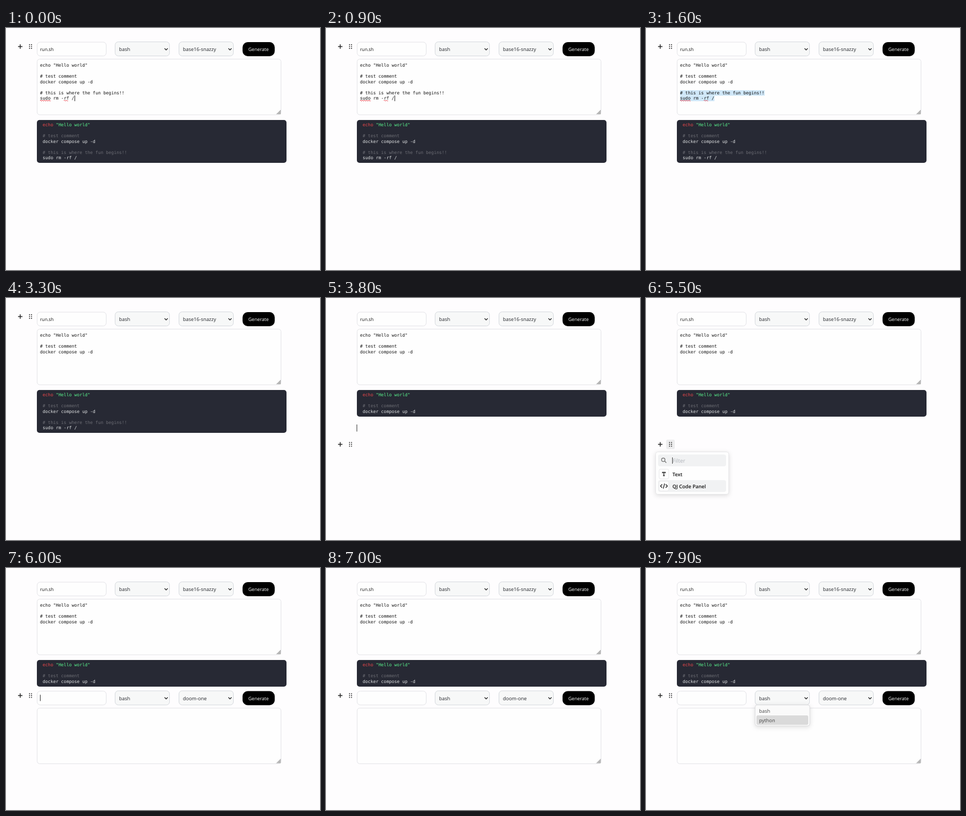
Write an HTML page that moves like this. It is 600 by 463 pixels and loops after 8000 ms.

```html
<!DOCTYPE html>
<html lang="en">
<head>
<meta charset="utf-8">
<title>Code block editor</title>
<style>
  html, body { margin: 0; height: 100%; overflow: hidden; background: #fefdfe; }
  svg { display: block; width: 100vw; height: 100vh; }
  text { font: 9.4px "Open Sans", "Noto Sans", sans-serif; fill: #24262b; text-rendering: geometricPrecision; white-space: pre; }
  .mono { font: 8.4px "DejaVu Sans Mono", monospace; fill: #111; }
  .mono.dark { fill: #e2e4e5; }
  .red { fill: #f0484c; }
  .green { fill: #5af78e; }
  .dim { fill: #6c6d74; }
  .bold { font-weight: 600; font-size: 9.5px; fill: #111; }
  .box { fill: #fefefe; stroke: #e2e2e6; }
  .select { fill: #f7f8f8; stroke: #d3d7dc; }
  .line { fill: none; stroke: #222; stroke-width: 1.4; }
  .shadow { filter: drop-shadow(0 2px 4px #0002); }
</style>
</head>
<body>
<svg id="stage" viewBox="0 0 600 463"></svg>
<script>
const LOOP = 8000, CHAR = 5.057, ROW = 10.5;

const rect = (x, y, w, h, r, attrs) =>
  `<rect x="${x}" y="${y}" width="${w}" height="${h}" rx="${r}" ${attrs}/>`;
const text = (x, y, s, attrs = '') => `<text x="${x}" y="${y}" ${attrs}>${s}</text>`;
const path = (d, attrs = 'class="line"') => `<path d="${d}" ${attrs}/>`;
const group = (id, body, attrs = '') => `<g id="${id}" ${attrs}>${body}</g>`;
const code = (x, y, row, s, cls = '') => text(x, y + row * ROW, s, `class="mono ${cls}"`);

const select = (x, label) =>
  rect(x + .5, 26.5, 104, 27, 6, 'class="select"') + text(x + 8, 44, label) +
  path(`M${x + 95} 39l3 3l3 -3`);

const block = (name, theme) =>
  rect(59.5, 27, 132, 26.5, 6, 'class="box"') +
  text(65, 44, name, 'style="font-size:8.7px;font-weight:500;fill:#111"') +
  select(208, 'bash') + select(330, theme) +
  rect(452, 27, 61.5, 27, 10, '') +
  text(482.5, 44, 'Generate', 'text-anchor="middle" style="font-size:9px;fill:#fff"') +
  rect(59.5, 59.5, 466, 106.5, 5, 'class="box"') +
  path('M517 165l8 -8v8z', 'fill="#ccc"') +
  path('M517 165l8 -8M520 165l5 -5M523 165l2 -2', 'stroke="#777" stroke-width=".8"');

const squiggle = (x, w) =>
  path(`M${x} 139` + 'q1 -2 2 0t2 0'.repeat(w / 4), 'fill="none" stroke="#e0222c" stroke-width=".9"');

const dots = [32, 35.5, 39].map(y =>
  [44.2, 48].map(x => rect(x - .2, y - .9, 1.8, 1.8, .4, 'fill="#333"')).join('')).join('');

const menu =
  rect(18.5, 294.5, 139.5, 81, 4, 'fill="#fefefe" stroke="#e6e6e8" class="shadow"') +
  rect(23, 299.5, 130, 22.5, 4, 'fill="#f1f2f3"') +
  '<circle cx="33" cy="309.5" r="3.3" class="line" style="stroke:#777"/>' +
  path('M35.5 312l3.3 3.3', 'stroke="#777" stroke-width="1.5"') +
  text(51, 314.5, 'Filter', 'style="font-size:10.2px;fill:#adb1b8"') +
  path('M50.5 305v12', 'stroke="#333"') +
  rect(23, 326, 130, 22.5, 4, 'id="hoverText" fill="#f1f2f3"') +
  rect(23, 348.5, 130, 22.5, 4, 'id="hoverCode" fill="#f1f2f3"') +
  [327.5, 350.5].map(y => rect(25, y, 18.5, 18.5, 3, 'fill="#fefefe" stroke="#e8e8ea"')).join('') +
  path('M31.5 335.2v-1.7h5.4v1.7M34.2 333.5v6.6M32.6 340h3.2') +
  path('M31 356.5l-3.4 3.3l3.4 3.3M37.5 356.5l3.4 3.3l-3.4 3.3M35.5 355l-2.4 9.6') +
  text(50.5, 340.5, 'Text', 'class="bold"') +
  text(50.5, 363.5, 'QJ Code Panel', 'class="bold"');

const dropdown =
  rect(208.5, 262, 104.5, 40, 4, 'fill="#fafafa" stroke="#dcdcde" class="shadow"') +
  rect(211, 264, 99, 18, 3, 'id="option" fill="#dadada"') +
  text(216, 276.5, 'bash', 'style="fill:#444"') + text(216, 294.5, 'python', 'style="fill:#444"');

document.getElementById('stage').innerHTML =
  block('run.sh', 'base16-snazzy') +
  code(65, 74, 0, 'echo "Hello world"') + code(65, 74, 2, '# test comment') +
  code(65, 74, 3, 'docker compose up -d') +
  group('tail',
    rect(65, 119, 0, 10.5, 0, 'id="sel1" fill="#cfe7f8"') +
    rect(65, 129.5, 0, 10.5, 0, 'id="sel2" fill="#cfe7f8"') +
    code(65, 74, 5, '# this is where the fun begins!!') + code(65, 74, 6, 'sudo rm -rf /') +
    squiggle(65, 20) + squiggle(110.5, 10)) +
  rect(59, 176, 477, 82, 5, 'id="preview" fill="#272934"') +
  code(70, 188, 0, '<tspan class="red">echo</tspan> <tspan class="green">"Hello world"</tspan>', 'dark') +
  code(70, 188, 2, '# test comment', 'dim') + code(70, 188, 3, 'docker compose up -d', 'dark') +
  group('result', code(70, 188, 5, '# this is where the fun begins!!', 'dim') +
    code(70, 188, 6, 'sudo rm -rf /', 'dark')) +
  group('second', block('', 'doom-one'), 'transform="translate(0 208.5)"') +
  group('handles', rect(38.5, 26.5, 16.5, 18, 3, 'id="grip" fill="#ededee"') +
    path('M23 35.5h8.4M27.2 31.3v8.4', 'stroke="#222" stroke-width="1.5"') + dots) +
  group('menu', menu) + group('dropdown', dropdown) +
  path('', 'id="caret" stroke="#222"');

const $ = id => document.getElementById(id);
const show = (id, on) => $(id).style.display = on ? '' : 'none';
const within = (t, a, b) => t >= a && t < b;
const set = (id, attrs) => { for (const k in attrs) $(id).setAttribute(k, attrs[k]); };

// [from, to, x, y, height]
const carets = [
  [0, 1000, 131.5, 129, 11], [2300, 2700, 65.5, 108, 11], [2700, 3300, 167, 97.5, 11],
  [3800, 4400, 59, 242, 13.5], [5900, 7000, 65.5, 242.5, 12]
];

// Drag from the end of the last line back to the start of the comment.
function drag(t) {
  const p = Math.max(0, Math.min(1, (t - 900) / 600));
  const col = Math.round(13 * (1 - p)), both = p > .5;
  const from = both ? 0 : col;
  set('sel1', { x: 65 + col * CHAR, width: both ? (32 - col) * CHAR : 0 });
  set('sel2', { x: 65 + from * CHAR, width: (13 - from) * CHAR });
}

function draw(t) {
  drag(t);
  show('tail', t < 2300);
  show('result', t < 3500);
  set('preview', { height: t < 3500 ? 82 : 51 });

  const y = t < 3600 ? 0 : t < 5800 ? 244.5 : 208.5;
  set('handles', { transform: `translate(0 ${y})` });
  show('grip', within(t, 4400, 5700));

  show('menu', within(t, 4600, 5800));
  $('menu').style.opacity = t < 5700 ? Math.min(1, (t - 4500) / 200) : .4;
  show('hoverText', within(t, 5300, 5400));
  show('hoverCode', within(t, 5400, 5800));

  show('second', t >= 5800);
  show('dropdown', t >= 7400);
  set('option', { y: t < 7900 ? 264 : 282 });

  const c = carets.find(c => within(t, c[0], c[1]));
  set('caret', { d: c ? `M${c[2]} ${c[3]}v${c[4]}` : '' });
}

const start = performance.now();
function frame() {
  const t = (performance.now() - start) % LOOP;
  draw(Math.floor(t / 100) * 100);
  requestAnimationFrame(frame);
}
frame();
</script>
</body>
</html>
```
